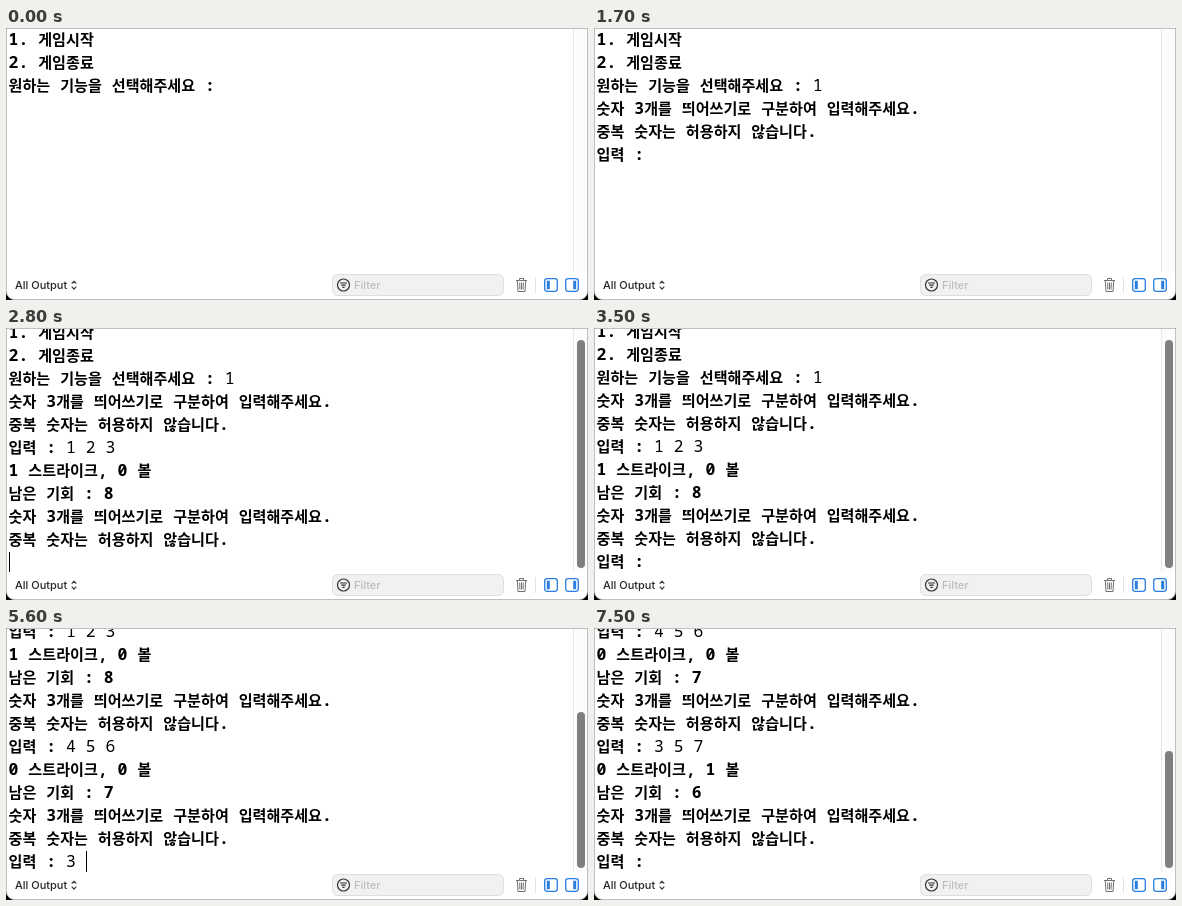
Write an HTML page that moves like this. It is 582 px wide and 272 px high and loops after 8000 ms.

```html
<!DOCTYPE html>
<html lang="ko">
<head>
<meta charset="utf-8">
<title>Console</title>
<style>
  html, body { margin: 0; width: 100%; height: 100%; overflow: hidden; background: #000; }
  svg { display: block; width: 582px; height: 272px; }
  .ko { font: 700 15.1px "Noto Sans CJK KR", "Noto Sans CJK", sans-serif; }
  .mono { font: 800 16.45px "Noto Sans Mono", monospace; }
  .typed { font-weight: 500; }
  .ui { font: 500 11px Inter, sans-serif; }
</style>
</head>
<body>
<svg viewBox="0 0 582 272">
  <defs><clipPath id="view"><rect y="1" width="567" height="243"/></clipPath></defs>
  <path d="M.5 .5V263.5a8 8 0 0 0 8 8H573.5a8 8 0 0 0 8-8V.5Z" fill="#fff" stroke="#c0c0c0"/>
  <rect x="568" y="1" width="13" height="243" fill="#fcfcfc"/>
  <path d="M567.5 1V244" stroke="#e8e8e8"/>
  <rect id="thumb" x="571" width="8" rx="4" fill="#7f7f7f"/>

  <g clip-path="url(#view)">
    <g id="log"></g>
    <rect id="caret" width="1" height="21"/>
  </g>

  <text class="ui" x="9" y="261" fill="#262626">All Output</text>
  <path d="M65.7 255.7l2.3-2.4 2.3 2.4M65.7 258.7l2.3 2.4 2.3-2.4" fill="none" stroke="#333" stroke-width="1.1"/>

  <rect x="326.5" y="246.5" width="171" height="21" rx="5" fill="#f1f1f1" stroke="#dedede"/>
  <g fill="none" stroke="#333" stroke-width="1.2">
    <circle cx="337.5" cy="257" r="6"/>
    <path d="M334 255h7M335.2 257.2h4.6M336.4 259.4h2.2"/>
  </g>
  <text class="ui" x="348" y="261" fill="#bcbcbc">Filter</text>

  <g fill="none" stroke="#707070">
    <path d="M510 252.5h11M513.5 252v-1.5h4V252M511.3 252.5l.7 11h7l.7-11M513.7 254.5l.2 7M515.5 254.5v7M517.3 254.5l-.2 7"/>
    <path d="M529.5 249v16" stroke="#e2e2e2"/>
  </g>
  <g fill="none" stroke="#2a7de1" stroke-width="1.3">
    <rect x="538.7" y="250.7" width="12.6" height="12.6" rx="2.5"/>
    <rect x="559.7" y="250.7" width="12.6" height="12.6" rx="2.5"/>
    <path d="M542.3 252.8v8.4M568.7 252.8v8.4" stroke-width="3"/>
  </g>
</svg>
<script>
const LOOP = 8000, ROW = 23, LEFT = 2.6, KO_W = 13.9, MONO_W = 9.88;
const el = id => document.getElementById(id);
const log = el('log'), caret = el('caret'), thumb = el('thumb');

const MENU = ['1. 게임시작', '2. 게임종료'];
const CHOOSE = '원하는 기능을 선택해주세요 : ';
const GUIDE = ['숫자 3개를 띄어쓰기로 구분하여 입력해주세요.', '중복 숫자는 허용하지 않습니다.'];
const PROMPT = '입력 : ';
const THUMB_END = 240;

// start: output appears; off: caret blinks out; keys: typing times
const ROUNDS = [
  { start: 1100, off: 1700, input: '1 2 3', keys: [1800, 2100, 2300, 2400, 2600], result: [] },
  { start: 2800, off: 3500, input: '4 5 6', keys: [3800, 4000, 4200, 4300, 4500],
    result: ['1 스트라이크, 0 볼', '남은 기회 : 8'], thumbTop: 12 },
  { start: 4700, off: 5300, input: '3 5 7', keys: [5400, 5600, 5800, 6100, 6500],
    result: ['0 스트라이크, 0 볼', '남은 기회 : 7'], thumbTop: 84 },
  { start: 6800, off: 7500, input: '', keys: [],
    result: ['0 스트라이크, 1 볼', '남은 기회 : 6'], thumbTop: 123 }
];

const isKo = s => /[가-힣]/.test(s);
const widthOf = s => [...s].reduce((w, c) => w + (isKo(c) ? KO_W : MONO_W), 0);

function runs(text, x, y, extra) {
  let out = '';
  for (const run of text.match(/[가-힣]+|[^가-힣\s]+|\s+/g) || []) {
    if (run.trim()) out += `<text class="${isKo(run) ? 'ko' : 'mono'}${extra}" x="${x.toFixed(2)}" y="${y}">${run}</text>`;
    x += widthOf(run);
  }
  return out;
}

function stateAt(t) {
  const lines = MENU.map(text => ({ text, typed: '' }));
  const add = (text, typed = '') => lines.push({ text, typed });
  add(CHOOSE, t >= 800 ? '1' : '');
  let caretOn = t >= 400, scroll = 0, thumbTop = 0;

  for (const r of ROUNDS) {
    if (t < r.start) break;
    const ready = t >= r.start + 100;
    [...r.result, ...GUIDE].forEach(s => add(s));
    add(ready ? PROMPT : '', r.input.slice(0, r.keys.filter(k => t >= k).length));
    caretOn = t < r.off || t >= r.keys[0];
    if (r.thumbTop) {
      scroll = (lines.length - 11) * ROW + (ready ? 8 : 7);
      thumbTop = r.thumbTop;
    }
  }
  return { lines, caretOn, scroll, thumbTop };
}

let shown = '';
function draw(t) {
  const s = stateAt(t), key = JSON.stringify(s);
  if (key === shown) return;
  shown = key;

  log.innerHTML = s.lines.map(({ text, typed }, i) => {
    const y = 17 + i * ROW - s.scroll;
    return y < -8 ? '' : runs(text, LEFT, y, '') + runs(typed, LEFT + widthOf(text), y, ' typed');
  }).join('');

  const last = s.lines[s.lines.length - 1];
  caret.setAttribute('x', Math.round(LEFT + widthOf(last.text + last.typed)));
  caret.setAttribute('y', 1 + (s.lines.length - 1) * ROW - s.scroll);
  caret.setAttribute('visibility', s.caretOn ? 'visible' : 'hidden');

  thumb.setAttribute('visibility', s.thumbTop ? 'visible' : 'hidden');
  thumb.setAttribute('y', s.thumbTop);
  thumb.setAttribute('height', THUMB_END - s.thumbTop);
}

const begin = performance.now();
function tick() {
  draw((performance.now() - begin) % LOOP);
  requestAnimationFrame(tick);
}
tick();
</script>
</body>
</html>
```
